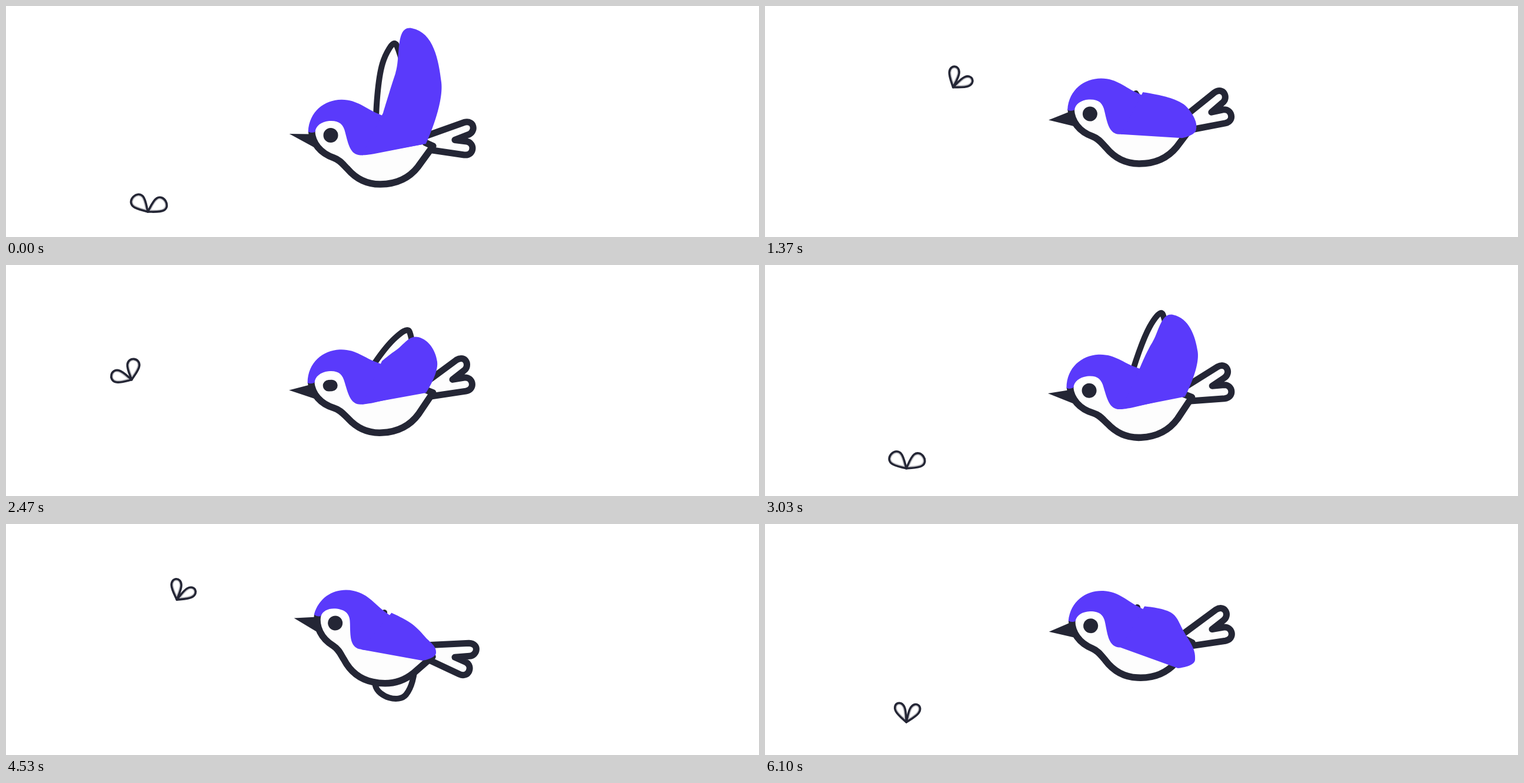
An HTML page with a canvas for the animation above (6130 ms loop, 1280 px wide and 394 px high).

```html
<!DOCTYPE html>
<html lang="en">
<head>
<meta charset="utf-8">
<title>Bird and butterfly</title>
<style>
  html, body { margin: 0; width: 100%; height: 100%; overflow: hidden; background: #fff; }
  canvas { display: block; width: 100%; height: 100%; }
</style>
</head>
<body>
<canvas width="1280" height="394"></canvas>
<script>
const ctx = document.querySelector('canvas').getContext('2d');
const INK = '#242635', PURPLE = '#5a3afb', WHITE = '#fdfdfd';
const LOOP = 6130, FRAMES = 184, FLAP_STEPS = 18, FLAP_STEP_MS = 32.78;
const FLUTTERS = 79, ROUND_MS = 3066;
const PIVOT = [636, 245];
const { sin, cos, PI } = Math;

const tail = new Path2D('M716 222L779 199.5C797 195 799 216 786 220.5L763 229.5L783 232C798 235 796 257 779 255L718 246');
const belly = new Path2D('M520 213C521 232 534 250 557 258C568 262 573 270 580 277C595 295 615 304 636 304C668 304 688 290 700 275L726 240L713 234');
const cap = new Path2D('M514 213C516 178 543 159 571 159C598 159 612 175 634 184L690 210L708 226L708 237L625 252C612 254 605 254 602 254C585 253 582 235 577 215C574 200 566 194 550 195C537 196 527 203 526 213Q520 216 514 213Z');

// Wing joints at the main moments of one flap: step, near wing x4, far wing x2.
const flap = [
  [0, 662, 115, 690, 38, 740, 130, 714, 235, 640, 98, 664, 67],
  [3, 662, 146, 701, 123, 733, 165, 714, 218, 662, 124, 686, 114],
  [4, 690, 162, 727, 167, 734, 192, 716, 212, 670, 170, 700, 182],
  [6, 690, 151, 709, 178, 731, 232, 702, 246, 665, 230, 692, 236],
  [7, 688, 146, 709, 180, 730, 264, 703, 284, 660, 262, 695, 255],
  [9, 686, 152, 708, 190, 716, 335, 698, 357, 668, 326, 698, 300],
  [12, 688, 169, 712, 192, 731, 220, 708, 233, 628, 276, 680, 291],
];

// Periodic cubic spline through rows of [time, ...values].
function sample(rows, time, period) {
  const n = rows.length;
  const row = i => {
    const wrap = Math.floor(i / n), [t, ...v] = rows[i - wrap * n];
    return { t: t + wrap * period, v };
  };
  const i = rows.findLastIndex(r => r[0] <= time);
  const [a, b, c, d] = [i - 1, i, i + 1, i + 2].map(row);
  const span = c.t - b.t, u = (time - b.t) / span;
  return b.v.map((p, j) => {
    const q = c.v[j];
    const m = (q - a.v[j]) / (c.t - a.t) * span;
    const k = (d.v[j] - p) / (d.t - b.t) * span;
    return p + u * (m + u * (3 * (q - p) - 2 * m - k + u * (2 * (p - q) + m + k)));
  });
}

// Smooth open curve; handles follow the neighbours and scale with each span.
function smooth(points) {
  const path = new Path2D();
  const handle = (i, reach) => {
    const p = points[i], a = points[i - 1], b = points[i + 1];
    if (!a || !b) return p;
    const k = 0.36 * reach / Math.hypot(b[0] - a[0], b[1] - a[1]);
    return [p[0] + k * (b[0] - a[0]), p[1] + k * (b[1] - a[1])];
  };
  path.moveTo(...points[0]);
  for (let i = 1; i < points.length; i++) {
    const [p, q] = [points[i - 1], points[i]];
    const chord = Math.hypot(q[0] - p[0], q[1] - p[1]);
    path.bezierCurveTo(...handle(i - 1, chord), ...handle(i, -chord), ...q);
  }
  return path;
}

function paint(path, fill, width) {
  if (fill) { ctx.fillStyle = fill; ctx.fill(path); }
  if (width) { ctx.lineWidth = width; ctx.strokeStyle = INK; ctx.stroke(path); }
}

// Draws with a shift of (x, y) and a turn in degrees about (px, py).
function placed(x, y, turn, [px, py], draw) {
  ctx.save();
  ctx.translate(px + x, py + y);
  ctx.rotate(turn * PI / 180);
  ctx.translate(-px, -py);
  draw();
  ctx.restore();
}

function drawBird(step) {
  const a = 2 * PI * step / FLAP_STEPS;
  const lift = -25 + 24 * cos(a) - 5 * sin(a) + cos(2 * a);
  const turn = 4.8 - 7.8 * cos(a - PI / 4);
  const tailTurn = -19.5 * sin(a);
  const beakY = 225 - 9 * cos(a) + 4 * sin(a);
  const eye = Math.abs(step - 3.5) < 1 ? 19.5 : 25;

  const onBody = (x, y) => {
    const r = turn * PI / 180, dx = x - PIVOT[0], dy = y - PIVOT[1];
    return [PIVOT[0] + dx * cos(r) - dy * sin(r), PIVOT[1] + lift + dx * sin(r) + dy * cos(r)];
  };
  const joints = sample(flap, step, FLAP_STEPS);
  const joint = i => joints.slice(2 * i, 2 * i + 2);

  paint(smooth([onBody(630, 184), joint(4), joint(5), onBody(690, 215)]), WHITE, 10);
  placed(0, lift, turn, PIVOT, () => {
    placed(0, 0, tailTurn - turn, [720, 235], () => paint(tail, WHITE, 11));
    paint(new Path2D(`M482 ${beakY}L515 217L526 212L526 241Z`), INK);
    paint(belly, WHITE, 11.5);
    paint(cap, PURPLE);
    const pupil = new Path2D();
    pupil.roundRect(539.8, 219.5 - eye / 2, 25, eye, eye / 2);
    paint(pupil, INK);
  });
  const wing = smooth([onBody(642, 182), joint(0), joint(1), joint(2), joint(3)]);
  wing.lineTo(...onBody(605, 254));
  paint(wing, PURPLE);
}

function drawButterfly(time, frame) {
  const a = 2 * PI * time / ROUND_MS;
  const beat = cos(2 * PI * FLUTTERS * frame / FRAMES);
  const x = 263 - 6 * cos(a) + 89 * sin(a) - 8 * cos(2 * a) - 37 * sin(2 * a) - 8 * cos(3 * a);
  const y = 217 + 106 * cos(a) + 40 * sin(a) + 20 * cos(2 * a) + 3 * sin(2 * a) + 3 * cos(3 * a);
  const tilt = 3 - 8 * cos(a) + 30 * sin(a) + 13 * cos(2 * a) + 6 * sin(3 * a);
  const spread = 40 + 11 * beat, w = 10 + 2 * beat;
  const wing = new Path2D(`M0 0C${-w / 2} -10 ${-w} -18 ${-w} -25C${-w} -39 ${w} -39 ${w} -25C${w} -18 ${w / 2} -10 0 0`);
  for (const side of [-1, 1]) {
    placed(x, y + 5 * beat, tilt + side * spread, [0, 0], () => {
      paint(wing, '#fff');
      ctx.save();
      ctx.clip(wing);
      ctx.globalAlpha = 0.25;
      paint(wing, null, 7);
      ctx.restore();
      paint(wing, null, 3.6);
    });
  }
}

function draw(now) {
  const frame = Math.floor((now % LOOP + 5) * 0.03) % FRAMES;
  const time = frame * 100 / 3;
  ctx.fillStyle = '#fff';
  ctx.fillRect(0, 0, 1280, 394);
  ctx.lineJoin = ctx.lineCap = 'round';
  drawBird(Math.floor(time / FLAP_STEP_MS) % FLAP_STEPS);
  drawButterfly(time, frame);
}

const start = performance.now();
function tick() {
  draw(performance.now() - start);
  requestAnimationFrame(tick);
}
tick();
</script>
</body>
</html>
```
